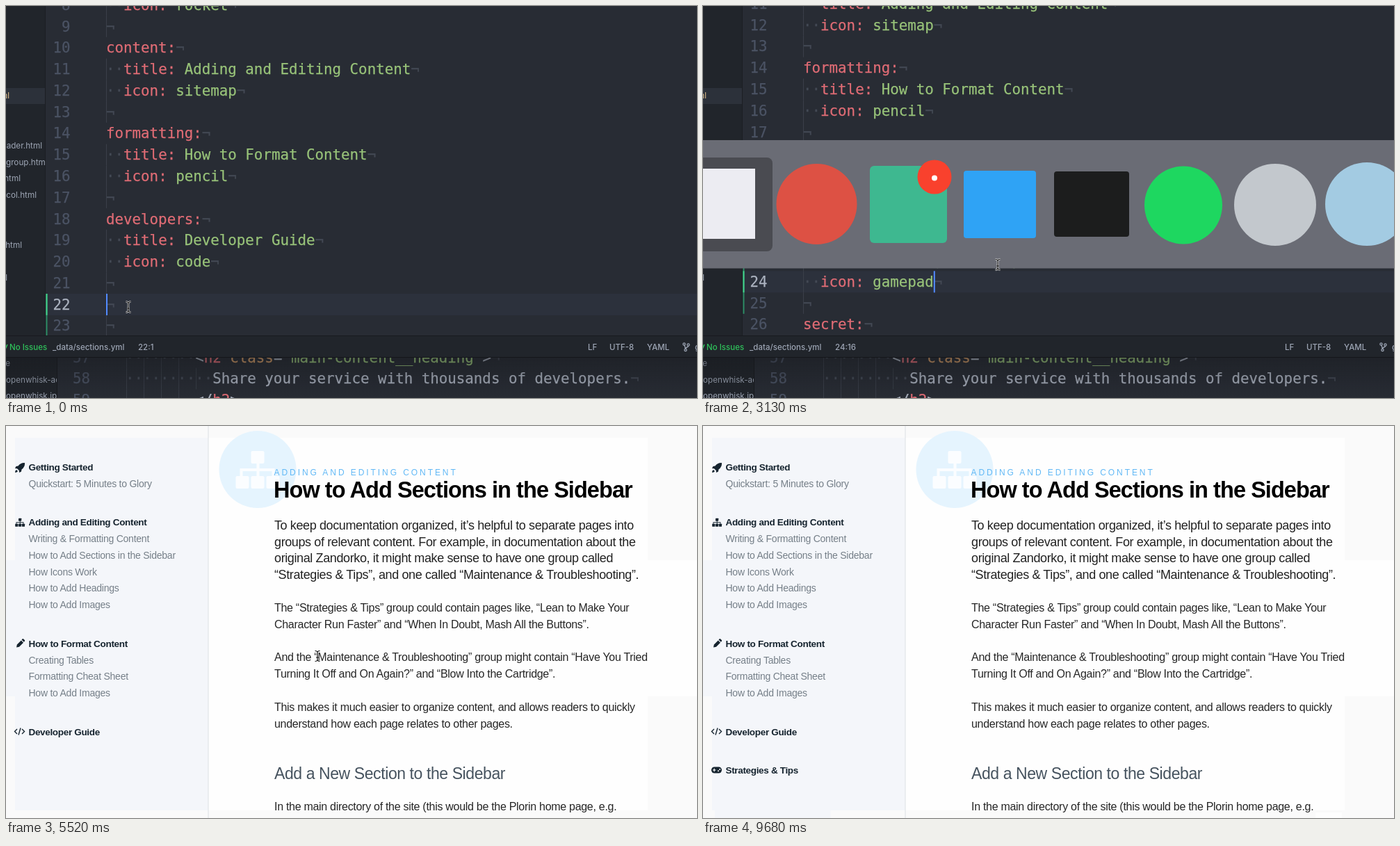
An HTML page that plays this animation: 994x564 px, repeating every 9.83 s.

```html
<!DOCTYPE html>
<html lang="en">
<head>
<meta charset="utf-8">
<title>Adding a sidebar section</title>
<style>
html, body { margin: 0; width: 100%; height: 100%; overflow: hidden; background: #282c34; }
svg { display: block; }
text { white-space: pre; }
.mono { font: 20.8px "DejaVu Sans Mono", monospace; color: #abb2bf; }
.mono text, .mono tspan { fill: currentColor; stroke: currentColor; stroke-width: .25px; }
.ui { font: 11.7px Inter, sans-serif; fill: #9da5b4; }
.status { font-size: 11.5px; font-weight: 500; }
.red { color: #e06c75; }
.green { color: #98c379; }
.orange { color: #d19a66; }
.dim { color: #434954; }
.num { color: #4b5364; text-anchor: end; }
.num.on { color: #abb2bf; }
.end { text-anchor: end; }

.page { font-family: "Liberation Sans", Arial, sans-serif; }
.h1 { font-size: 32.5px; font-weight: 700; letter-spacing: -.94px; fill: #000; }
.h2 { font-size: 23px; letter-spacing: -.41px; fill: #46535f; }
.eyebrow { font-size: 12px; letter-spacing: 2.93px; fill: #62b9f6; }
.lead { font-size: 18px; letter-spacing: -.385px; fill: #222; }
.body { font-size: 16px; letter-spacing: -.29px; fill: #262626; }
.group { font-size: 13.5px; font-weight: 700; letter-spacing: -.33px; fill: #16242f; }
.link { font-size: 14px; letter-spacing: -.24px; fill: #757f88; }
.icon { fill: #16242f; }
.stroke { fill: none; stroke: #16242f; stroke-width: 1.4; }

.anim { animation: 9.83s step-end infinite; }
#before { animation-name: before; }
#after { animation-name: after; }
#row { animation-name: row; }
#caret { animation-name: caret, blink; }
#pos1 { animation-name: before; }
#pos2 { animation-name: after; }
#page { animation-name: page; }
#settled { animation-name: settled; }
#strip { animation-name: strip; }
#patch { animation-name: patch; }
#added { animation-name: added; }
#panel { animation-name: panel; }
#apps { animation-name: apps; }
#pick { animation-name: pick; }
#appname { animation-name: appname; }
#mouse { animation-name: move; }
#beam { animation-name: beam; }
#hand { animation-name: hand; }
#arrow { animation-name: arrow; }

@keyframes before { 0% { visibility: visible } 10.68%, 100% { visibility: hidden } }
@keyframes after {
  0% { visibility: hidden; transform: none }
  10.68% { visibility: visible; transform: none }
  12.1%, 100% { visibility: visible; transform: translateY(-94.2px) }
}
@keyframes row { 0% { transform: none } 24.31%, 100% { transform: translateY(-32.7px) } }
@keyframes caret {
  0% { transform: none }
  10.68% { transform: translate(187.8px, 61.5px) }
  12.1%, 100% { transform: translate(187.8px, -32.7px) }
}
@keyframes blink {
  0%, 6.1%, 10.68%, 19.73%, 28.89%, 37.94% { visibility: visible }
  1.52%, 15.15%, 24.31%, 33.36%, 40.99%, 100% { visibility: hidden }
}
@keyframes page { 0% { visibility: hidden } 42.52%, 100% { visibility: visible } }
@keyframes settled { 0% { visibility: hidden } 45.57%, 100% { visibility: visible } }
@keyframes strip {
  0% { visibility: hidden; transform: none }
  69.78% { visibility: visible; transform: none }
  89.52%, 100% { visibility: visible; transform: scaleX(1.14) }
}
@keyframes patch { 0% { visibility: hidden } 93.99%, 100% { visibility: visible } }
@keyframes added { 0% { visibility: hidden } 60.63%, 100% { visibility: visible } }
@keyframes panel {
  0% { opacity: 0; fill: #6a6c75 }
  31.84% { opacity: 1; fill: #6a6c75 }
  42.52% { opacity: .5; fill: #fafafa }
  44.04% { opacity: .2; fill: #fafafa }
  45.57%, 100% { opacity: 0; fill: #fafafa }
}
@keyframes apps {
  0% { opacity: 0 } 31.84% { opacity: 1 } 42.52% { opacity: .55 }
  44.04% { opacity: .2 } 45.57%, 100% { opacity: 0 }
}
@keyframes pick { 0% { transform: translateX(-131px) } 36.41%, 100% { transform: none } }
@keyframes appname { 0% { visibility: hidden } 36.41%, 100% { visibility: visible } }
@keyframes move {
  0% { transform: translate(176px, 433px) }
  16.68% { transform: translate(303px, 383px) }
  19.73% { transform: translate(390px, 375px) }
  21.26% { transform: translate(424px, 372px) }
  40.99% { transform: translate(427px, 380px) }
  56.15% { transform: translate(448px, 331px) }
  57.68% { transform: translate(425px, 345px) }
  59.2% { transform: translate(350px, 385px) }
  60.63% { transform: translate(299px, 409px) }
  65.2% { transform: translate(255px, 437px) }
  66.73% { transform: translate(190px, 474px) }
  68.26% { transform: translate(120px, 515px) }
  69.78% { transform: translate(60px, 540px) }
  71.21% { transform: translate(20px, 546px) }
  72.73% { transform: translate(24px, 532px) }
  74.26% { transform: translate(40px, 516px) }
  75.78% { transform: translate(66px, 502px) }
  77.31% { transform: translate(52px, 498px) }
  78.84% { transform: translate(30px, 493px) }
  80.36% { transform: translate(100px, 490px) }
  81.89% { transform: translate(144px, 518px) }
  83.41% { transform: translate(146px, 540px) }
  84.94% { transform: translate(105px, 490px) }
  89.52%, 100% { transform: translate(166px, 538px) }
}
@keyframes beam {
  0%, 56.15% { visibility: visible }
  40.99%, 59.2%, 100% { visibility: hidden }
}
@keyframes hand {
  0%, 56.15%, 81.89%, 89.52%, 100% { visibility: hidden }
  40.99%, 75.78%, 84.94% { visibility: visible }
}
@keyframes arrow {
  0%, 75.78%, 84.94%, 90.94%, 100% { visibility: hidden }
  59.2%, 81.89%, 89.52% { visibility: visible }
}
</style>
</head>
<body>
<svg width="994" height="564" viewBox="0 0 994 564">
  <defs>
    <linearGradient id="shade" x2="0" y2="1">
      <stop stop-color="#14161a" stop-opacity=".42"/>
      <stop offset="1" stop-color="#14161a" stop-opacity="0"/>
    </linearGradient>
    <g id="tree">
      <rect x="-9" y="-26" width="19" height="18" rx="2"/>
      <rect x="-31" y="10" width="19" height="18" rx="2"/>
      <rect x="-9" y="10" width="19" height="18" rx="2"/>
      <rect x="13" y="10" width="19" height="18" rx="2"/>
      <path d="M-1-10h4v9h22v12h-4v-8h-42v8h-4v-12h24z M-1 0h4v12h-4z"/>
    </g>
    <path id="bar" fill="none" d="M-3.500-7.500q3.500 0 3.500 2.500q0-2.500 3.500-2.500M0-5v10M-3.500 7.500q3.500 0 3.500-2.500q0 2.500 3.500 2.500M-2 2h4"/>
  </defs>

  <!-- editor window -->
  <svg width="994" height="474" class="mono">
    <rect width="994" height="474" fill="#282c34"/>
    <rect id="row" class="anim" x="58" y="414" width="936" height="31" fill="#2c313c"/>
    <g id="before" class="anim"></g>
    <g id="after" class="anim"></g>
    <rect id="caret" class="anim" x="144" y="414" width="2" height="31" fill="#528bff"/>
  </svg>
  <svg width="57" height="474" class="ui">
    <rect width="57" height="474" fill="#21252b"/>
    <rect y="118" width="57" height="23" fill="#2c313a"/>
    <rect x="56" width="1" height="474" fill="#1b1e23"/>
    <text class="end" x="5" y="133" style="fill:#e2c08d">ml</text>
    <text class="end" x="52" y="205">ader.html</text>
    <text x="0" y="229">group.html</text>
    <text class="end" x="21" y="252">html</text>
    <text class="end" x="44" y="276">col.html</text>
    <text class="end" x="23" y="348">html</text>
    <text class="end" x="2" y="395">l</text>
  </svg>

  <!-- second window, below -->
  <svg y="506" width="994" height="58" viewBox="0 506 994 58">
    <rect y="506" width="994" height="58" fill="#282c34"/>
    <g class="mono" id="below"></g>
    <svg y="506" width="73" height="58" viewBox="0 506 73 58" class="ui">
      <rect y="506" width="73" height="58" fill="#21252b"/>
      <text class="end" x="6" y="518">e</text>
      <text x="0" y="542">openwhisk-acme</text>
      <text x="0" y="565">openwhisk.jpg</text>
    </svg>
    <rect x="73" y="506" width="1" height="58" fill="#181a1f"/>
    <rect y="506" width="994" height="58" fill="url(#shade)"/>
  </svg>

  <!-- status bar -->
  <g class="ui status">
    <rect y="474" width="994" height="32" fill="#21252b"/>
    <rect y="474" width="994" height="1" fill="#181a1f"/>
    <rect y="505" width="994" height="1" fill="#14161a"/>
    <path d="M-3 491l2 3 3-7" fill="none" stroke="#2fc25b" stroke-width="1.5"/>
    <text x="5" y="494.500" style="fill:#2fc25b">No Issues</text>
    <text x="67" y="494.500">_data/sections.yml</text>
    <text id="pos1" class="anim" x="190" y="494.500">22:1</text>
    <g transform="translate(0 94.2)"><text id="pos2" class="anim" x="190" y="494.500">24:16</text></g>
    <text x="837" y="494.500">LF</text>
    <text x="868" y="494.500">UTF-8</text>
    <text x="922" y="494.500">YAML</text>
    <g fill="none" stroke="#9da5b4" stroke-width="1.3">
      <circle cx="975.500" cy="486.500" r="1.600"/><circle cx="981.500" cy="487.500" r="1.600"/>
      <circle cx="977.500" cy="495" r="1.600"/><path d="M976 488l1.500 5.500q0-2 2-2.500t2-2"/>
    </g>
    <text x="991" y="494.500">g</text>
  </g>

  <!-- web page -->
  <g id="page" class="page anim">
    <rect width="994" height="564" fill="#fafafa"/>
    <g id="settled" class="anim">
      <path d="M291 17h632v176h71v196h-71v164h-632z" fill="#fefefe"/>
      <path d="M13 17h278v536h-278v-164h-13v-196h13z" fill="#f4f6fa"/>
    </g>
    <g transform="translate(17 553)"><rect id="strip" class="anim" width="146" height="11" fill="#f4f6fa"/></g>
    <rect id="patch" class="anim" x="881" y="556" width="38" height="8" fill="#fefefe"/>
    <rect x="290.500" width="1" height="564" fill="#dcdfe3"/>
    <circle cx="362" cy="62.500" r="55.500" fill="#e5f4fe"/>
    <use href="#tree" x="361.500" y="62" fill="#fbfdff"/>

    <path class="icon" d="M27 53q-6-.5-9.500 4.500l-3 .5-1.500 3 3 .2 2.800 2.800.2 3 3-1.500.5-3q5-3.500 4.500-9.500zM15 63q-2 1-2 4 3 0 4-2z"/>
    <use href="#tree" class="icon" transform="translate(20 138.500) scale(.22)"/>
    <path class="icon" d="M15 318.500l.8-4 6-6 3.200 3.200-6 6zM22.500 307.500l1.300-1.200q.7-.5 1.400.2l1.600 1.600q.7.700.2 1.400l-1.300 1.200z"/>
    <path class="stroke" d="M16 436l-3.500 3.500 3.500 3.500M23 436l3.500 3.500-3.500 3.500M21 434.500l-3 10"/>
    <g id="added" class="anim">
      <rect class="icon" x="12" y="490.500" width="15" height="9" rx="4.500"/>
      <path d="M14 495h4.500M16.200 492.800v4.500" stroke="#fff" stroke-width="1.200"/>
      <circle cx="22" cy="496.200" r="1" fill="#fff"/><circle cx="24.200" cy="494" r="1" fill="#fff"/>
      <text class="group" x="32.500" y="500">Strategies &amp; Tips</text>
    </g>
    <g id="copy"></g>
  </g>

  <!-- app switcher -->
  <rect id="panel" class="anim" y="193" width="994" height="184.500"/>
  <g id="apps" class="anim">
    <rect id="pick" class="anim" x="96" y="218" width="135" height="135" rx="8" fill="#000" fill-opacity=".3"/>
    <rect x="-26" y="234" width="101" height="101" fill="#ececf2"/>
    <circle cx="163.500" cy="285" r="58" fill="#dd5144"/>
    <rect x="240" y="230" width="111" height="111" rx="6" fill="#3eb890"/>
    <circle cx="333" cy="246" r="24.500" fill="#f9412d"/>
    <circle cx="333" cy="247.500" r="4" fill="#fff"/>
    <rect x="375" y="237" width="104" height="97" rx="4" fill="#2fa3f5"/>
    <rect x="505" y="238" width="108" height="94" rx="4" fill="#1c1d1d"/>
    <circle cx="691" cy="286.500" r="56" fill="#1ed760"/>
    <circle cx="823" cy="286" r="59" fill="#c3c8cd"/>
    <circle cx="955" cy="285" r="60" fill="#a3cbe2"/>
    <text id="appname" class="anim" x="163" y="371" text-anchor="middle" style="font:15px Inter,sans-serif;fill:#101014">Orvella Tindo</text>
  </g>

  <!-- pointer -->
  <g id="mouse" class="anim">
    <g id="beam" class="anim">
      <use href="#bar" stroke="#fff" stroke-width="2.6" stroke-opacity=".85"/>
      <use href="#bar" stroke="#000" stroke-width="1.1"/>
    </g>
    <path id="hand" class="anim" transform="translate(-.8 .4) scale(1.1)" d="M-3.500-6.500q1.500-1.500 2.800.5l1.700 4q1-1.500 2.300 0 1.200-1.200 2.200.3 1.400-.8 1.800.8l.4 4q0 2-1 5h-7q-2-3.500-5-6.300-1.400-2 .6-2.200l2 1z" fill="#fff" stroke="#000" stroke-width="1.200"/>
    <path id="arrow" class="anim" d="M0 0v15.500l3.600-3.300 2.400 5.600 2.700-1.100-2.400-5.500h4.900z" fill="#000" stroke="#fff" stroke-width="1.100"/>
  </g>
</svg>

<script>
const ROW = 30.77, CH = 12.52;
const $ = id => document.getElementById(id);
const rowTop = n => 414 + (n - 22) * ROW;
const esc = s => s.replace(/&/g, '&amp;').replace(/</g, '&lt;');
const span = (cls, s) => `<tspan class="${cls}">${esc(s)}</tspan>`;
const text = (x, y, body, cls = '') => `<text x="${x}" y="${y}" class="${cls}">${body}</text>`;
const guide = (x, y) => `<rect x="${x}" y="${y}" width="1" height="${ROW}" fill="#3a3f49"/>`;

function yamlRow(s, n, active) {
  const y = rowTop(n), base = y + 22.6;
  const [, pad, key, value] = s.match(/^( *)(\w*:?)(.*)$/);
  const code = span('dim', '·'.repeat(pad.length)) + span('red', key) + span('green', value) + span('dim', '¬');
  return (pad || !s ? guide(144, y) : '') +
    text(92.5, base, n, n === active ? 'num on' : 'num') + text(144, base, code);
}

function gitMark(from, to, active) {
  const bar = (a, b, c) => `<rect x="57.5" y="${rowTop(a)}" width="2" height="${(b - a) * ROW}" fill="${c}"/>`;
  return bar(from, to, '#2b8a63') + bar(active, active + 1, '#43d08a');
}

const yaml = (rows, active, last) =>
  rows.map((s, i) => yamlRow(s, i + 8, active)).join('') + gitMark(22, last, active);

const head = ['  icon: rocket', '',
  'content:', '  title: Adding and Editing Content', '  icon: sitemap', '',
  'formatting:', '  title: How to Format Content', '  icon: pencil', '',
  'developers:', '  title: Developer Guide', '  icon: code', ''];
const tips = ['tips:', '  title: Strategies & Tips', '  icon: gamepad'];

$('before').innerHTML = yaml([...head, '', ''], 22, 24);
$('after').innerHTML = yaml([...head, ...tips, '', 'secret:'], 24, 26);

const html = [
  [8, span('', '<') + span('red', 'h2') + span('orange', ' class') + span('', '=') + span('green', '"main-content__heading"') + span('', '>')],
  [10, span('', 'Share your service with thousands of developers.')],
  [8, span('', '</') + span('red', 'h2') + span('', '>')]
];
$('below').innerHTML = html.map(([pad, code], i) => {
  const y = 512.6 + i * ROW;
  const guides = [0, 2, 4, 6, 8].filter(c => c < pad).map(c => guide(173 + c * CH, y - 22.6)).join('');
  return guides + text(121, y, 57 + i, 'num') + text(172, y, span('dim', '·'.repeat(pad)) + code + span('dim', '¬'));
}).join('');

// class, x, first baseline, step, lines
const copy = [
  ['group', 32.5, 63.5, 0, 'Getting Started'],
  ['link', 32.5, 88, 0, 'Quickstart: 5 Minutes to Glory'],
  ['group', 32.5, 143, 0, 'Adding and Editing Content'],
  ['link', 32.5, 167, 23.8, 'Writing & Formatting Content', 'How to Add Sections in the Sidebar', 'How Icons Work', 'How to Add Headings', 'How to Add Images'],
  ['group', 32.5, 317.5, 0, 'How to Format Content'],
  ['link', 32.5, 341.5, 23.8, 'Creating Tables', 'Formatting Cheat Sheet', 'How to Add Images'],
  ['group', 32.5, 444.5, 0, 'Developer Guide'],
  ['eyebrow', 385.5, 70.5, 0, 'ADDING AND EDITING CONTENT'],
  ['h1', 385, 102.5, 0, 'How to Add Sections in the Sidebar'],
  ['lead', 386, 149, 23.7, 'To keep documentation organized, it’s helpful to separate pages into',
    'groups of relevant content. For example, in documentation about the',
    'original Zandorko, it might make sense to have one group called',
    '“Strategies & Tips”, and one called “Maintenance & Troubleshooting”.'],
  ['body', 386, 267, 23.8, 'The “Strategies & Tips” group could contain pages like, “Lean to Make Your',
    'Character Run Faster” and “When In Doubt, Mash All the Buttons”.', '',
    'And the “Maintenance & Troubleshooting” group might contain “Have You Tried',
    'Turning It Off and On Again?” and “Blow Into the Cartridge”.', '',
    'This makes it much easier to organize content, and allows readers to quickly',
    'understand how each page relates to other pages.'],
  ['h2', 386, 508, 0, 'Add a New Section to the Sidebar'],
  ['body', 386, 552.5, 0, 'In the main directory of the site (this would be the Plorin home page, e.g.']
];
$('copy').innerHTML = copy.map(([cls, x, y, step, ...rows]) =>
  rows.map((s, i) => text(x, y + i * step, esc(s), cls)).join('')).join('');
</script>
</body>
</html>
```
